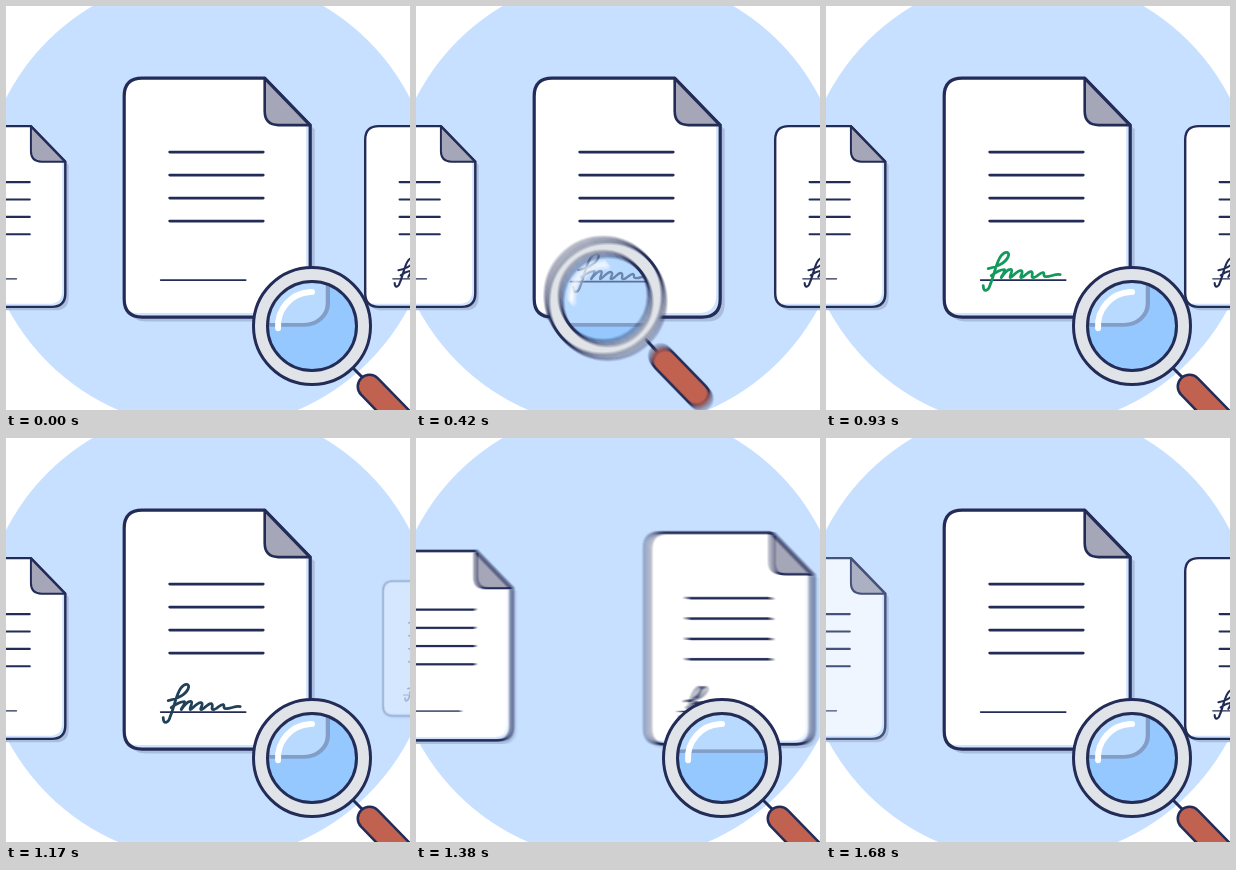
Write an HTML page with a canvas that moves like this. It is 404x404 px and loops after 1.71 s.

```html
<!DOCTYPE html>
<html lang="en">
<head>
<meta charset="utf-8">
<title>Signature check</title>
<style>
html, body { margin: 0; width: 100%; height: 100%; overflow: hidden; background: #fff; }
canvas { display: block; width: 404px; height: 404px; }
</style>
</head>
<body>
<canvas id="stage" width="404" height="404"></canvas>
<script>
const SIZE = 404, LOOP = 1710, STEP = 30, SAMPLES = 9;
const NAVY = [35, 44, 87], GREEN = [18, 165, 92], INK = '#232c57';
const LEFT = { x: -11, y: 210.5, s: 0.756 };
const MID = { x: 211.2, y: 191.6, s: 1 };
const RIGHT = { x: 429.5, y: 210.5, s: 0.756 };
// Glass centre every 120 ms
const PATH = [[306, 320], [262, 276], [207, 251.5], [180, 273], [212, 311], [291, 325], [306, 320]];

const newContext = () => {
  const canvas = document.createElement('canvas');
  canvas.width = canvas.height = SIZE;
  return canvas.getContext('2d');
};
const out = document.getElementById('stage').getContext('2d');
const scene = newContext(), layer = newContext();

const ramp = (t, a, b) => Math.min(1, Math.max(0, (t - a) / (b - a)));
const ease = u => u < 0.5 ? 2 * u * u : 1 - 2 * (1 - u) ** 2;
const mix = (a, b, u) => a + (b - a) * u;
const mixPose = (a, b, u) => ({ x: mix(a.x, b.x, u), y: mix(a.y, b.y, u), s: mix(a.s, b.s, u) });
const mixColor = (a, b, u) => `rgb(${a.map((v, i) => Math.round(mix(v, b[i], u)))})`;

function arc(r, from = 0, to = 7) {
  const path = new Path2D();
  path.arc(0, 0, r, from, to);
  return path;
}

// Document shapes, drawn around the centre of the page
const page = new Path2D('M-75-119.5H47.5L93-72.5V101.5Q93 119.5 75 119.5H-75Q-93 119.5-93 101.5V-101.5Q-93-119.5-75-119.5Z');
const fold = new Path2D('M47.5-119.5V-86.5Q47.5-72.5 61.5-72.5H93Z');
const textLines = new Path2D([-45.5, -22.5, 0.5, 23.5].map(y => `M-47.5 ${y}H46`).join(''));
const signLine = new Path2D('M-56.5 82.5H28.5');
const signature = new Path2D('M-49 71C-42 70-32 66-29 59C-27 54-32 53-36 58C-41 64-43 78-47 87C-49 94-54 95-54 88' +
  'M-46 78C-42 75-36 72-33 72C-31 73-36 79-36 80C-34 77-29 71-26 72C-24 73-28 79-27 80C-25 80-20 72-16 73' +
  'C-13 74-18 80-16 80C-13 80-9 73-6 74C-3 75-7 80-4 80C0 80 3 74 6 75C8 76 5 79 9 79C14 79 18 76 23 77');
const lensPage = new Path2D();
lensPage.roundRect(-93, -119.5, 186, 239, 20);

// Magnifier shapes, drawn around the centre of the glass
const glass = arc(44.5), rim = arc(58.5), shine = arc(34, Math.PI * 0.98, Math.PI * 1.5);
const neck = new Path2D('M41 42L52 53'), grip = new Path2D('M57.5 60.5L93 97');

function stroke(c, path, width, color = INK) {
  c.lineWidth = width;
  c.strokeStyle = color;
  c.stroke(path);
}

function fill(c, path, color) {
  c.fillStyle = color;
  c.fill(path);
}

function place(c, pose) {
  c.translate(pose.x, pose.y);
  c.scale(pose.s, pose.s);
  c.lineCap = c.lineJoin = 'round';
}

function drawDoc(pose, alpha, ink) {
  const c = layer;
  c.clearRect(0, 0, SIZE, SIZE);
  c.save();
  place(c, pose);
  c.save();
  c.translate(4.5, 4.5);
  fill(c, page, '#a9bddf');
  c.restore();
  fill(c, page, '#cfe4ff');
  c.save();
  c.clip(page);
  c.translate(-4, -4);
  fill(c, page, '#fff');
  c.restore();
  fill(c, fold, '#a5a6b7');
  stroke(c, fold, 2.6);
  stroke(c, page, 3.2);
  stroke(c, textLines, 2.8);
  stroke(c, signLine, 1.7);
  if (ink) stroke(c, signature, 2.8, ink);
  c.restore();
  scene.globalAlpha = alpha;
  scene.drawImage(layer.canvas, 0, 0);
  scene.globalAlpha = 1;
}

// Smooth curve through the points of PATH
function lensCentre(t) {
  if (t >= 720) return PATH[6];
  const i = Math.floor(t / 120), f = t / 120 - i;
  const [a, b, c, d] = [-1, 0, 1, 2].map(k => PATH[Math.min(6, Math.max(0, i + k))]);
  return [0, 1].map(k => b[k] + f / 2 * (c[k] - a[k] +
    f * (2 * a[k] - 5 * b[k] + 4 * c[k] - d[k] + f * (3 * (b[k] - c[k]) + d[k] - a[k]))));
}

function drawLens(t, docs) {
  const c = scene, [x, y] = lensCentre(t);
  c.save();
  c.translate(x, y);
  c.lineCap = 'round';
  stroke(c, neck, 3);
  stroke(c, grip, 26);
  stroke(c, grip, 21, '#c16150');
  fill(c, rim, '#e0e4e9');
  stroke(c, rim, 3);
  fill(c, glass, '#95c8fe');

  c.save();
  c.clip(glass);
  c.translate(-x, -y);
  for (const { pose, sign } of docs) {
    c.save();
    place(c, pose);
    c.save();
    c.scale(1.19, 1.065);
    fill(c, lensPage, '#b9daff');
    stroke(c, lensPage, 3.6, '#829dc6');
    c.restore();
    c.translate(0, 1.5);
    stroke(c, signLine, 1.7, '#5b7099');
    c.globalAlpha = sign * 0.75;
    if (sign) stroke(c, signature, 1 + 1.4 * sign, '#506a94');
    c.restore();
  }
  c.restore();

  stroke(c, shine, 6, '#fff');
  stroke(c, glass, 3);
  c.restore();
}

function drawScene(t, lensTime) {
  const c = scene;
  c.fillStyle = '#fff';
  c.fillRect(0, 0, SIZE, SIZE);
  c.save();
  c.translate(202, 195.5);
  fill(c, arc(227), '#c8e0ff');
  c.restore();

  const gone = ease(ramp(t, 1060, 1230));
  const signed = mixPose(MID, RIGHT, ease(ramp(t, 1220, 1550)));
  const next = mixPose(LEFT, MID, ease(ramp(t, 1290, 1620)));
  const arrive = ease(ramp(t, 1620, 1710));
  const ink = t < 900
    ? mixColor(NAVY, GREEN, ramp(t, 420, 690))
    : mixColor(GREEN, NAVY, ramp(t, 900, 1230));

  if (gone < 1) drawDoc({ ...RIGHT, s: mix(0.756, 0.5, gone) }, 1 - gone, INK);
  if (arrive) drawDoc(LEFT, arrive);
  drawDoc(next, 1);
  drawDoc(signed, 1, t > 350 && ink);
  drawLens(lensTime, [{ pose: next, sign: 0 }, { pose: signed, sign: ramp(t, 130, 420) }]);
}

// Average nearby moments for motion blur, shorter for the pages than for the lens
function render(t) {
  for (let i = 0; i < SAMPLES; i++) {
    const offset = 2 * i / (SAMPLES - 1) - 1;
    drawScene(Math.max(0, t + 3 * offset), t && t + 9 * offset);
    out.globalAlpha = 1 / (i + 1);
    out.drawImage(scene.canvas, 0, 0);
  }
}

const start = performance.now();
function tick() {
  const t = (performance.now() - start) % LOOP;
  render(Math.floor(t / STEP) * STEP);
  requestAnimationFrame(tick);
}
tick();
</script>
</body>
</html>
```
